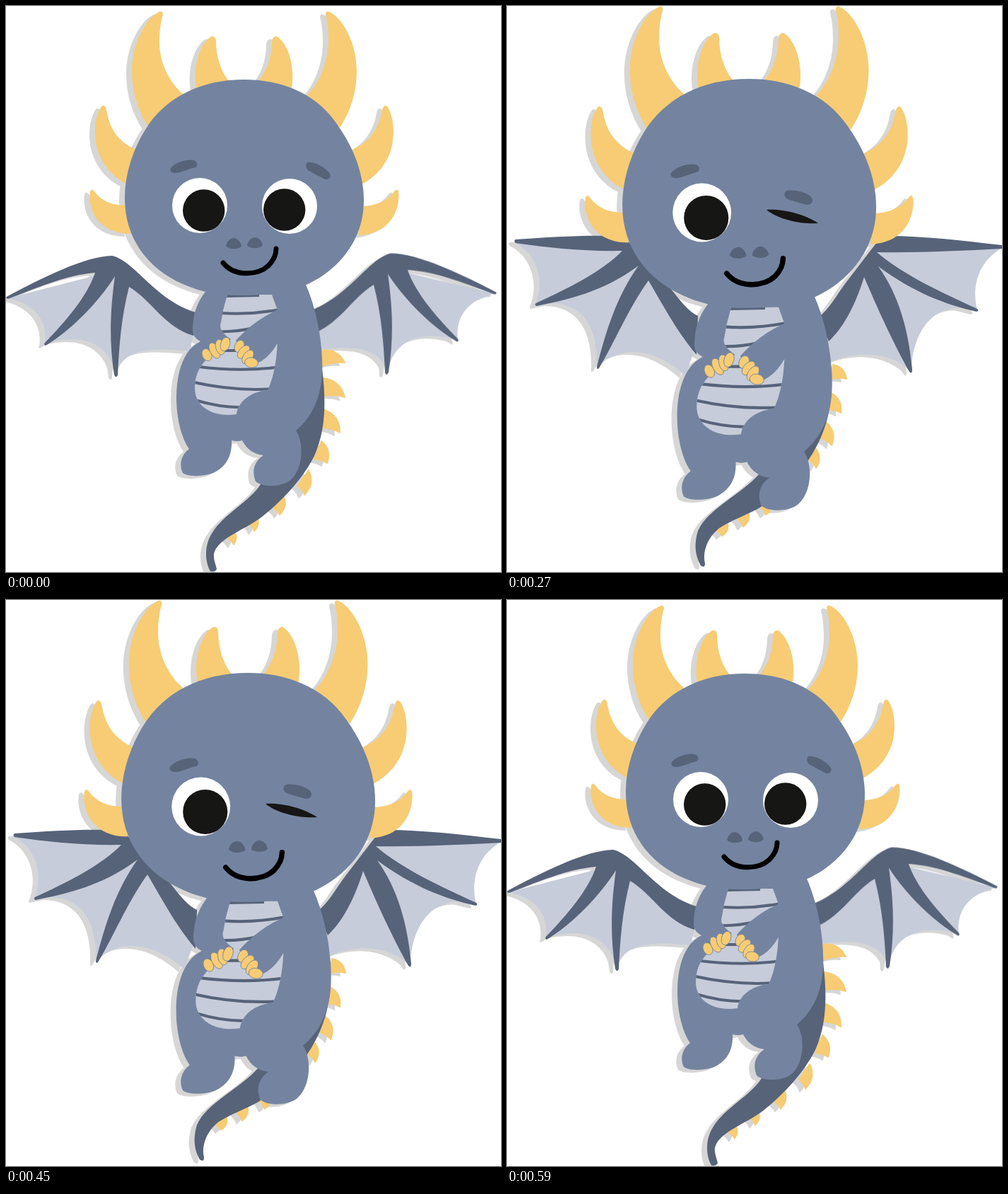
Write an HTML page that moves like this. It is 700 px wide and 800 px high and loops after 600 ms.

```html
<!DOCTYPE html>
<html lang="en">
<head>
<meta charset="utf-8">
<title>Winking dragon</title>
<style>
  html, body { margin: 0; width: 100%; height: 100%; overflow: hidden; background: #fff; }
  svg { display: block; width: 700px; height: 800px; }
  .pose { filter: drop-shadow(-8px 4px 0 #d6d6d6); }
  .skin { fill: #7484a0; }
  .dark { fill: #576379; }
  .light { fill: #c6ccd9; }
  .gold { fill: #f7cc74; }
  .ink { fill: #161615; }
  .white { fill: #fff; }
  .spikes path { stroke: #f7cc74; stroke-width: 2; stroke-linejoin: round; }
  .claws ellipse { stroke: #7484a0; stroke-width: .8; }
  .stripes { fill: none; stroke: #576379; stroke-width: 4; }
  .mouth { fill: none; stroke: #000; stroke-width: 7; stroke-linecap: round; }
</style>
</head>
<body>
<svg viewBox="0 0 700 800" xmlns="http://www.w3.org/2000/svg">
  <defs>
    <clipPath id="bellyClip">
      <path id="belly" d="M313 408H376L384 430C385 470 385 510 370 543C345 545 328 560 326 577C295 582 267 568 267 540C267 520 275 508 285 498L318 471C305 462 301 455 304 447L307 430Z"/>
    </clipPath>

    <g id="wing">
      <path class="light" d="M2 413C40 420 60 445 55 478C90 465 145 465 155 522C165 485 200 482 260 488L266 460L150 375Z"/>
      <path class="dark" d="M1 411C50 385 110 354 150 353C182 360 210 415 268 433L265 466C225 455 205 415 174 397C163 440 160 480 158 522Q155 527 153 521C145 470 148 425 154 382C130 420 90 460 56 480Q53 479 55 476C85 445 115 410 126 377C85 380 40 400 3 414Q-1 413 1 411Z"/>
    </g>

    <g id="core">
      <g class="gold">
        <path d="M217 8C196 18 178 55 178 92C178 120 186 148 202 172L250 124C228 105 216 75 217 48C217 35 219 22 222 12Q222 7 217 8Z"/>
        <path d="M457 8C478 18 496 55 496 92C496 120 488 148 472 172L426 126C446 106 456 75 456 48C456 35 455 22 452 12Q452 7 457 8Z"/>
        <path d="M290 43C274 53 264 85 269 116L315 106C304 92 297 72 297 50Q297 42 290 43Z"/>
        <path d="M383 43C399 53 409 85 404 116L357 106C369 92 376 72 376 50Q377 42 383 43Z"/>
        <path d="M135 142C126 155 124 178 128 197C133 220 148 240 170 251L184 203C158 192 146 172 142 147Q140 138 135 142Z"/>
        <path d="M539 142C548 155 550 178 546 197C541 220 526 240 503 252L490 203C515 192 528 172 532 147Q534 138 539 142Z"/>
        <path d="M119 262C115 284 128 322 176 322L170 282C150 282 135 276 125 262Q121 257 119 262Z"/>
        <path d="M555 262C558 284 546 323 498 324L504 283C524 282 539 276 549 262Q553 257 555 262Z"/>
      </g>

      <path class="skin" d="M285 400C268 420 264 440 264 460C265 467 269 471 275 474C250 486 241 520 241 553C241 585 249 612 259 626C246 636 245 650 250 660C258 666 280 665 293 660C312 651 320 635 319 614Q327 616 334 614C340 626 351 634 364 635C349 645 348 660 353 672C362 680 385 680 398 673C418 662 424 622 410 600C432 582 445 555 447 520C449 480 440 430 424 394Z"/>
      <use href="#belly" class="light"/>
      <path class="stripes" clip-path="url(#bellyClip)" d="M311 410L358 409M304 434Q345 437 386 429M300 460Q325 461 350 455M305 487H335M265 509Q330 518 388 510M262 531Q320 545 380 541M264 556Q305 569 342 567"/>
      <path class="skin" d="M390 427C362 438 340 456 325 473L345 508C363 505 375 492 383 478L392 470Z"/>
      <g class="gold claws">
        <ellipse rx="6.5" ry="9" transform="translate(284 493) rotate(-25)"/>
        <ellipse rx="6.5" ry="12" transform="translate(295 487) rotate(-28)"/>
        <ellipse rx="6.5" ry="11" transform="translate(303 482) rotate(-14)"/>
        <ellipse rx="6.5" ry="10" transform="translate(310 478) rotate(18)"/>
        <ellipse rx="6.5" ry="9" transform="translate(330 481) rotate(25)"/>
        <ellipse rx="6.5" ry="11" transform="translate(336 489) rotate(42)"/>
        <ellipse rx="6.5" ry="11" transform="translate(342 496) rotate(35)"/>
        <ellipse rx="9.5" ry="7" transform="translate(347 504) rotate(10)"/>
      </g>

      <path class="skin" d="M337 104C385 104 437 121 468 167C491 199 506 236 506 275C506 342 455 385 412 399C388 406 362 409 330 409C300 409 275 404 250 393C200 371 168 328 168 272C168 236 181 198 202 167C230 128 276 104 337 104Z"/>
      <path class="dark" d="M233 229C240 220 258 216 266 218C271 220 272 226 268 228C258 230 248 236 239 236C234 236 231 233 233 229Z"/>
      <circle class="white" cx="274" cy="282" r="39"/>
      <circle class="ink" cx="279.7" cy="289" r="29.7"/>
      <path class="dark" d="M311 339C313 331 318 328 323 328C329 329 333 336 333 340C328 344 316 345 311 339Z"/>
      <path class="dark" d="M363 338C361 330 356 327 351 327C345 328 341 335 341 339C346 343 358 344 363 338Z"/>
      <path class="mouth" d="M307 363C323 383 356 381 371 367C379 359 382 352 382 343"/>
    </g>
  </defs>

  <g class="pose" id="awake">
    <use href="#wing"/>
    <use href="#wing" transform="matrix(-1 .02 0 1 694 -6.5)"/>
    <g class="gold spikes"></g>
    <path class="dark" d="M447 512C453 560 452 600 436 636C420 668 390 700 362 722C335 742 300 752 294 774C293 782 297 790 298 796Q295 801 289 799C281 785 280 762 292 744C308 718 345 700 360 676L400 600Z"/>
    <use href="#core"/>
    <path class="dark" d="M426 221C436 219 453 229 458 237C460 242 457 246 451 245C443 241 435 236 428 233C424 230 423 224 426 221Z"/>
    <circle class="white" cx="401" cy="283" r="39"/>
    <circle class="ink" cx="393.7" cy="288" r="29.7"/>
  </g>

  <g class="pose" id="wink">
    <path class="light" d="M12 335C42 350 54 388 40 422C95 412 130 440 127 512C155 480 205 480 252 522L268 480L200 360L160 335Z"/>
    <path class="dark" d="M12 330C70 326 120 323 165 326L215 380C238 405 250 428 270 438L268 493C240 460 222 425 200 388C170 430 150 480 130 512Q127 515 127 510C140 460 155 410 186 367C135 405 85 415 42 424Q38 423 41 420C85 400 135 375 163 346C110 347 60 342 12 335Q9 332 12 330Z"/>
    <path class="light" d="M700 342C668 360 656 395 665 430C610 415 575 450 571 517C545 490 500 485 458 503L450 470L500 360L530 335Z"/>
    <path class="dark" d="M700 338C640 331 580 324 530 325L480 390C465 410 455 430 440 440L455 474C475 455 492 425 505 383C525 430 548 480 569 517Q573 521 573 514C568 460 555 410 525 368C575 405 620 422 664 432Q668 431 665 428C615 405 560 380 523 348C580 349 640 346 700 343Z"/>
    <g class="gold spikes"></g>
    <path class="dark" d="M459 540C458 580 445 615 424 645L400 630Z"/>
    <path class="dark" d="M358 660C330 692 284 710 270 742C263 765 268 780 274 791Q280 795 280 788C276 772 283 752 300 738C325 722 352 716 370 700L385 670Z"/>
    <use href="#core" transform="matrix(1.062 0 0 1.062 -15.3 -7.5)"/>
    <path class="dark" d="M396 261C408 259 426 264 431 271C434 277 430 281 424 281C413 278 405 276 397 273C391 270 391 263 396 261Z"/>
    <path class="ink" d="M367 288C385 286 420 293 440 307C420 309 385 303 367 288Z"/>
  </g>
</svg>
<script>
  // Each spike: upper base, tip, lower base.
  const spikes = {
    awake: [
      [446, 487, 479, 504, 446, 509], [448, 526, 479, 553, 448, 551],
      [451, 571, 472, 603, 447, 596], [446, 615, 454, 646, 436, 640],
      [428, 656, 422, 691, 413, 678], [392, 692, 387, 719, 379, 710],
      [355, 722, 351, 742, 344, 732], [322, 741, 322, 761, 311, 750]
    ],
    wink: [
      [461, 507, 480, 527, 458, 527], [458, 547, 472, 575, 453, 570],
      [452, 589, 459, 621, 443, 610], [437, 626, 437, 653, 426, 641],
      [373, 703, 366, 719, 359, 708], [341, 713, 334, 736, 326, 724],
      [312, 731, 304, 749, 296, 740]
    ]
  };

  function spikePath([ax, ay, tx, ty, bx, by]) {
    const nx = ty - ay, ny = ax - tx;
    const bend = (x, y, k) => `${(x + tx) / 2 + nx * k} ${(y + ty) / 2 + ny * k}`;
    return `<path d="M${ax} ${ay}Q${bend(ax, ay, .35)} ${tx} ${ty}Q${bend(bx, by, .12)} ${bx} ${by}Z"/>`;
  }

  for (const id in spikes) {
    document.querySelector(`#${id} .spikes`).innerHTML = spikes[id].map(spikePath).join("");
  }

  const LOOP = 600, WINK_START = 270, WINK_END = 570;
  const awake = document.getElementById("awake");
  const wink = document.getElementById("wink");
  const start = performance.now();

  function draw(now) {
    const t = Math.max(0, now - start) % LOOP;
    const winking = t >= WINK_START && t < WINK_END;
    awake.style.display = winking ? "none" : "";
    wink.style.display = winking ? "" : "none";
    requestAnimationFrame(draw);
  }
  draw(start);
</script>
</body>
</html>
```
